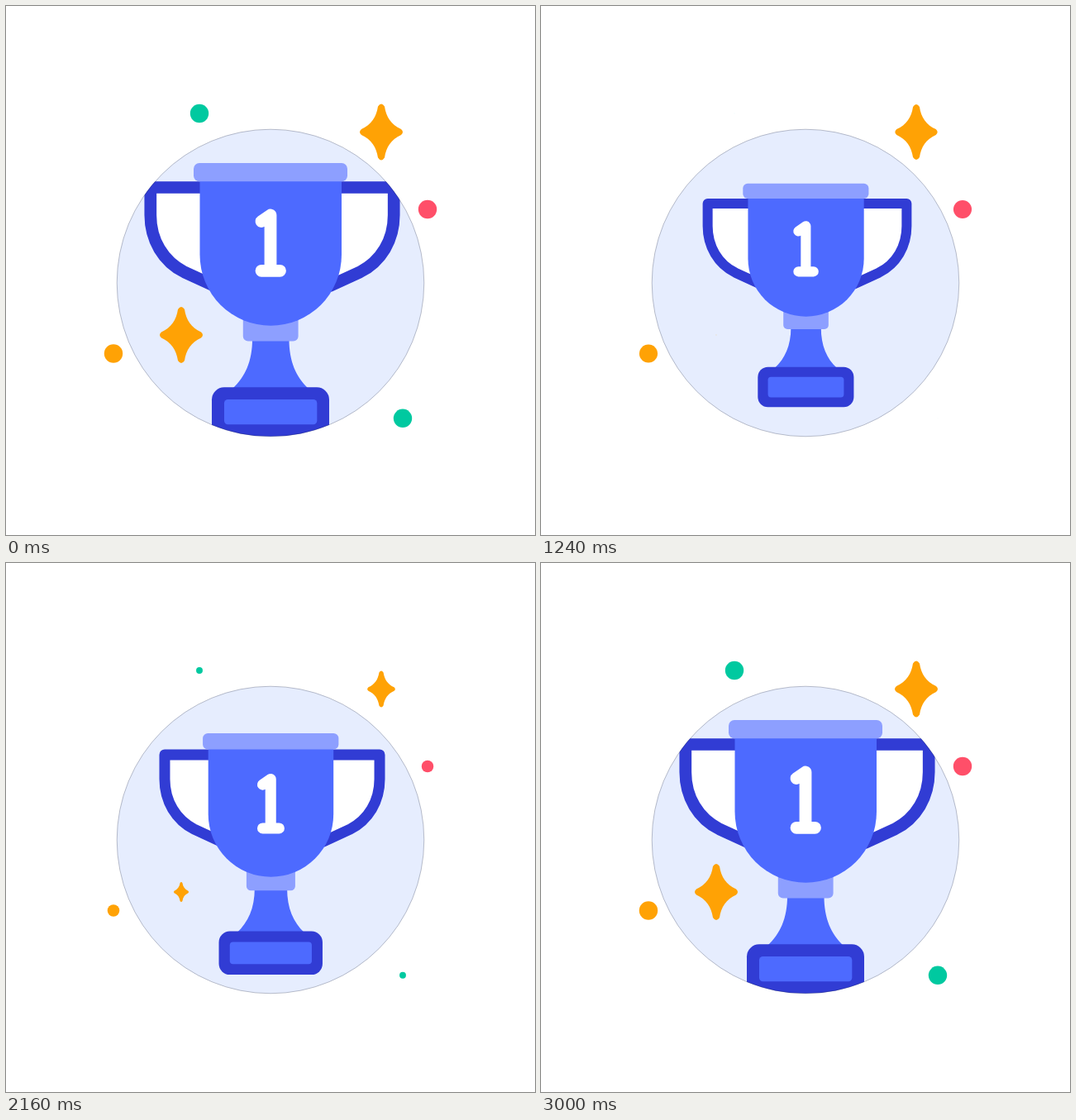
An HTML page with a canvas for the animation above (3.04 s loop, 640x640 px).

```html
<!DOCTYPE html>
<html lang="en">
<head>
<meta charset="utf-8">
<title>Trophy</title>
<style>
  html, body { margin: 0; width: 100%; height: 100%; overflow: hidden; background: #fff; }
  canvas { display: block; width: 640px; height: 640px; }
</style>
</head>
<body>
<canvas id="stage" width="640" height="640"></canvas>
<script>
const ctx = document.getElementById('stage').getContext('2d');
const LOOP = 3040, STEP = 40;
const NAVY = '#313cd4', BLUE = '#4d6aff', SOFT = '#8d9fff', PALE = '#e6edfe';
const GREEN = '#00c9a0', ORANGE = '#ffa205', RED = '#ff4f69';
const DISC = { x: 320, y: 335, r: 186 };

const ease = u => {
  u = Math.min(1, Math.max(0, u));
  return u * u * (3 - 2 * u);
};

// Full size until `start`, then swings between 0 and 1 every 600 ms, ending full.
function twinkle(t, start, end) {
  if (t <= start || t >= end) return 1;
  const n = (t - start) / 600, k = Math.floor(n), e = ease(n - k);
  return k % 2 ? e : 1 - e;
}

function circle(x, y, r, color) {
  ctx.beginPath();
  ctx.arc(x, y, r, 0, Math.PI * 2);
  ctx.fillStyle = color;
  ctx.fill();
}

function box(x, y, w, h, radii, color) {
  ctx.beginPath();
  ctx.roundRect(x, y, w, h, radii);
  ctx.fillStyle = color;
  ctx.fill();
}

function shape(path, color) {
  ctx.fillStyle = color;
  ctx.fill(new Path2D(path));
}

function line(path, width, color) {
  ctx.lineWidth = width;
  ctx.strokeStyle = color;
  ctx.stroke(new Path2D(path));
}

function star(x, y, size) {
  ctx.save();
  ctx.translate(x, y);
  ctx.scale(size, size);
  shape('M-4-31Q0-37 4-31C6-18 12-9 24-3.5Q28 0 24 3.5C12 9 6 18 4 31' +
        'Q0 37-4 31C-6 18-12 9-24 3.5Q-28 0-24-3.5C-12-9-6-18-4-31Z', ORANGE);
  ctx.restore();
}

function handle() {
  const path = 'M245 219.5H174.8V253C174.8 283 190 309 216 322L252 338.5';
  shape(path + 'Z', '#fff');
  line(path, 14.7, NAVY);
}

function trophy(size) {
  ctx.save();
  ctx.translate(322, 326);
  ctx.scale(size, size);
  ctx.translate(-322, -326);
  ctx.lineJoin = ctx.lineCap = 'round';

  handle();
  ctx.save();
  ctx.translate(644, 0);
  ctx.scale(-1, 1);
  handle();
  ctx.restore();

  shape('M298 403C298 430 289 449 274 463H366C351 449 342.5 430 342.5 403Z', BLUE);
  box(286.8, 370, 66.8, 35.5, [0, 0, 6, 6], SOFT);
  box(249, 461.3, 142, 59.5, 15, NAVY);
  box(264, 476, 112.3, 30.3, 4.5, BLUE);
  shape('M234.5 205H406V301A85.75 85.75 0 0 1 234.5 301Z', BLUE);
  box(227, 190, 186, 22.3, 7, SOFT);
  line('M309 260.5L320 253V320.3M309 320.3H331.5', 14.8, '#fff');
  ctx.restore();
}

function draw(t) {
  ctx.fillStyle = '#fff';
  ctx.fillRect(0, 0, 640, 640);

  const a = twinkle(t, 600, 3000), b = twinkle(t, 0, 2400);

  circle(DISC.x, DISC.y, DISC.r, PALE);
  ctx.save();
  ctx.beginPath();
  ctx.arc(DISC.x, DISC.y, DISC.r, 0, Math.PI * 2);
  ctx.clip();
  trophy(1 - 0.198 * ease(1 - Math.abs(t - 1500) / 1500));
  ctx.restore();

  // hairline rim
  ctx.beginPath();
  ctx.arc(DISC.x, DISC.y, DISC.r - 0.2, 0, Math.PI * 2);
  ctx.lineWidth = 0.5;
  ctx.strokeStyle = 'rgba(20, 25, 45, 0.5)';
  ctx.stroke();

  star(212, 398, a);
  star(454, 152.5, b);
  circle(234, 130, 11.2 * a, GREEN);
  circle(480, 498.8, 11.2 * a, GREEN);
  circle(510, 246, 11.2 * b, RED);
  circle(130, 420.5, 11.2 * b, ORANGE);
}

const begin = performance.now();
function tick() {
  const t = (performance.now() - begin) % LOOP;
  draw(Math.floor(t / STEP) * STEP);
  requestAnimationFrame(tick);
}
tick();
</script>
</body>
</html>
```
